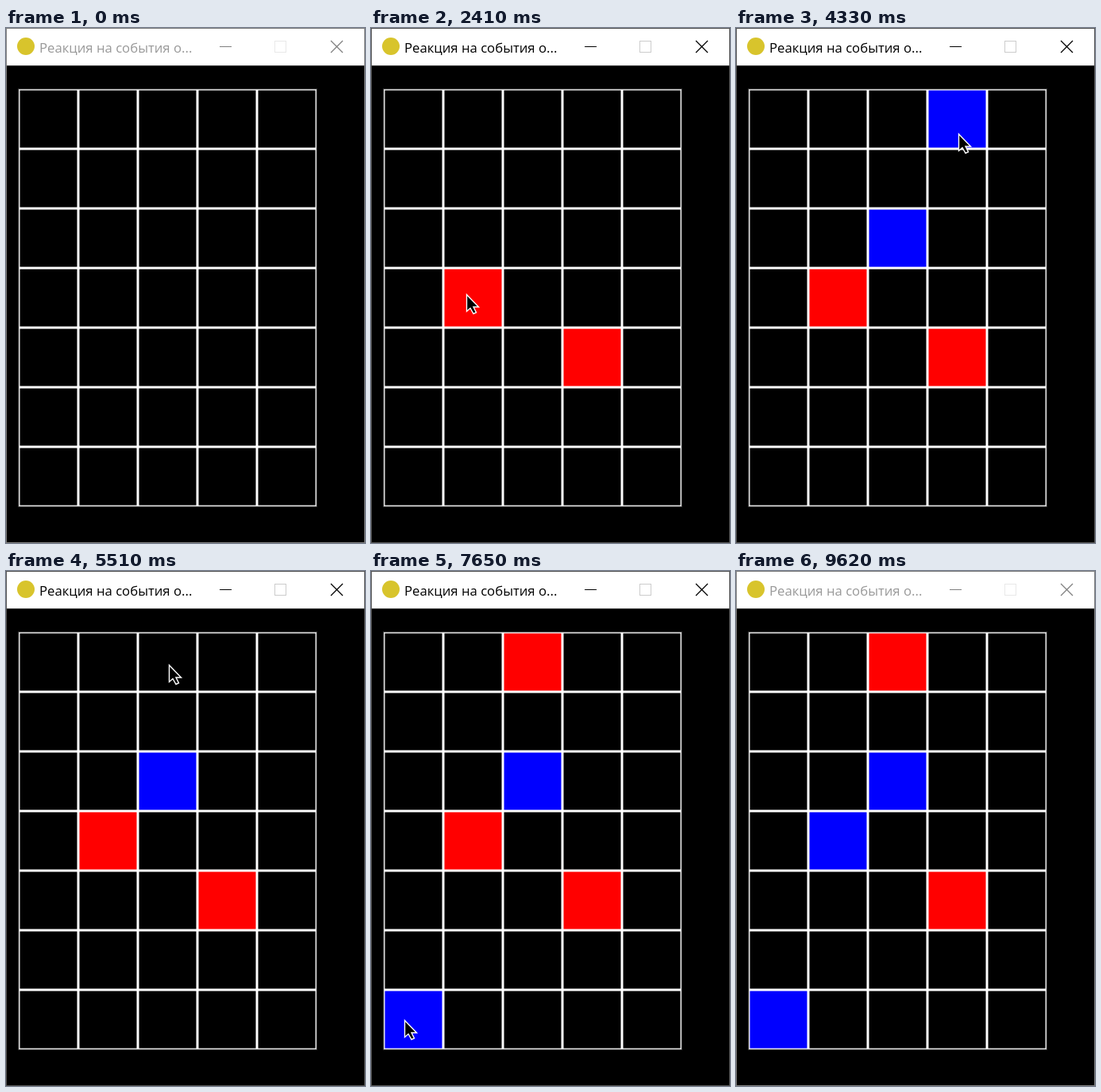
Animation of 452x648 px, one loop 9700 ms. Source, as an HTML page with a canvas:

```html
<!DOCTYPE html>
<html lang="ru">
<head>
<meta charset="utf-8">
<title>Клетки</title>
<style>
html, body { margin: 0; width: 100%; height: 100%; overflow: hidden; background: #000; }
canvas { display: block; }
</style>
</head>
<body>
<canvas id="stage" width="452" height="648"></canvas>
<script>
const ctx = document.getElementById('stage').getContext('2d');
const LOOP = 9700, ENTER = 60, ACTIVATE = 590, LEAVE = 9620;
const CELL = 75, LEFT = 16, TOP = 77, COLS = 5, ROWS = 7;
const COLORS = ['#000', '#f00', '#00f'];

// Pointer stops: arrival, departure, x, y, then the times of clicks made there.
const STOPS = [
  [0, ENTER, 395, 650],
  [520, 1400, 350, 495, 590, 930, 1290],
  [1530, 1530, 309, 483],
  [1710, 1930, 280, 412, 1790],
  [2250, 2570, 120, 335, 2330],
  [2930, 3450, 184, 255, 3070, 3290],
  [3800, 4850, 280, 133, 3850, 4090, 4610],
  [4990, 5150, 259, 140],
  [5400, 5650, 205, 118, 5530],
  [6050, 6050, 8, 440],
  [6290, 6500, 38, 552, 6350],
  [6610, 6610, 114, 566],
  [6750, 7110, 330, 660],
  [7500, 7750, 42, 565, 7610],
  [8150, 8230, 158, 252],
  [8450, 8700, 158, 317, 8610],
  [8970, LOOP, 259, 505]
];

const ARROW = new Path2D('M.5 .5V21.5L5 17.5L9 24.5L12.5 23L9 16H15.5Z');

function rect(color, x, y, w, h) {
  ctx.fillStyle = color;
  ctx.fillRect(x, y, w, h);
}

function frame(color, width, x, y, w, h) {
  ctx.strokeStyle = color;
  ctx.lineWidth = width;
  ctx.strokeRect(x + width / 2, y + width / 2, w - width, h - width);
}

function pointerAt(t) {
  const i = STOPS.findIndex(stop => t <= stop[1]);
  const [arrive, , x, y] = STOPS[i];
  if (t >= arrive) return [x, y];
  const [, depart, x0, y0] = STOPS[i - 1];
  const k = (t - depart) / (arrive - depart);
  const ease = k * k * (3 - 2 * k);
  return [Math.round(x0 + (x - x0) * ease), Math.round(y0 + (y - y0) * ease)];
}

function clickCount(col, row, t) {
  let count = 0;
  for (const [, , x, y, ...clicks] of STOPS) {
    const hit = Math.floor((x - LEFT) / CELL) === col && Math.floor((y - TOP) / CELL) === row;
    if (hit) count += clicks.filter(time => time <= t).length;
  }
  return count;
}

function drawWindow(active) {
  rect(active ? '#555' : '#808080', 0, 0, 452, 648);
  rect('#fff', 1, 1, 450, 46);
  rect('#000', 1, 47, 450, 600);
  rect('#444', 1, 47, 450, 1);

  ctx.fillStyle = '#d8c42c';
  ctx.beginPath();
  ctx.arc(25, 23, 11, 0, 2 * Math.PI);
  ctx.fill();

  ctx.fillStyle = active ? '#000' : '#999';
  ctx.font = '16.7px "Open Sans", "Noto Sans", sans-serif';
  ctx.fillText('Реакция на события о...', 42, 31);

  const ink = active ? '#000' : '#808080';
  rect(ink, 269, 23, 15, 1);
  frame(active ? '#ccc' : '#e8e8e8', 1, 338, 16, 15, 15);
  ctx.strokeStyle = ink;
  ctx.lineWidth = 1.3;
  ctx.beginPath();
  ctx.moveTo(409, 16);
  ctx.lineTo(424, 31);
  ctx.moveTo(424, 16);
  ctx.lineTo(409, 31);
  ctx.stroke();
}

function drawBoard(t) {
  const w = COLS * CELL, h = ROWS * CELL;
  for (let row = 0; row < ROWS; row++) {
    for (let col = 0; col < COLS; col++) {
      const x = LEFT + col * CELL, y = TOP + row * CELL;
      rect(COLORS[clickCount(col, row, t) % 3], x + 1, y + 1, CELL - 2, CELL - 2);
      frame('#fff', 1.5, x, y, CELL, CELL);
    }
  }
  // The outer edge is slightly blurred.
  frame('#d4d4d4', 1, LEFT, TOP, w, h);
  frame('#2b2b2b', 1, LEFT - 1, TOP - 1, w + 2, h + 2);
}

function drawPointer(t) {
  ctx.save();
  ctx.translate(...pointerAt(t));
  ctx.fillStyle = '#000';
  ctx.strokeStyle = '#fff';
  ctx.lineWidth = 1.4;
  ctx.fill(ARROW);
  ctx.stroke(ARROW);
  ctx.restore();
}

const start = performance.now();
function tick() {
  const t = (performance.now() - start) % LOOP;
  drawWindow(t >= ACTIVATE && t < LEAVE);
  drawBoard(t);
  if (t >= ENTER && t < LEAVE) drawPointer(t);
  requestAnimationFrame(tick);
}
tick();
</script>
</body>
</html>
```
